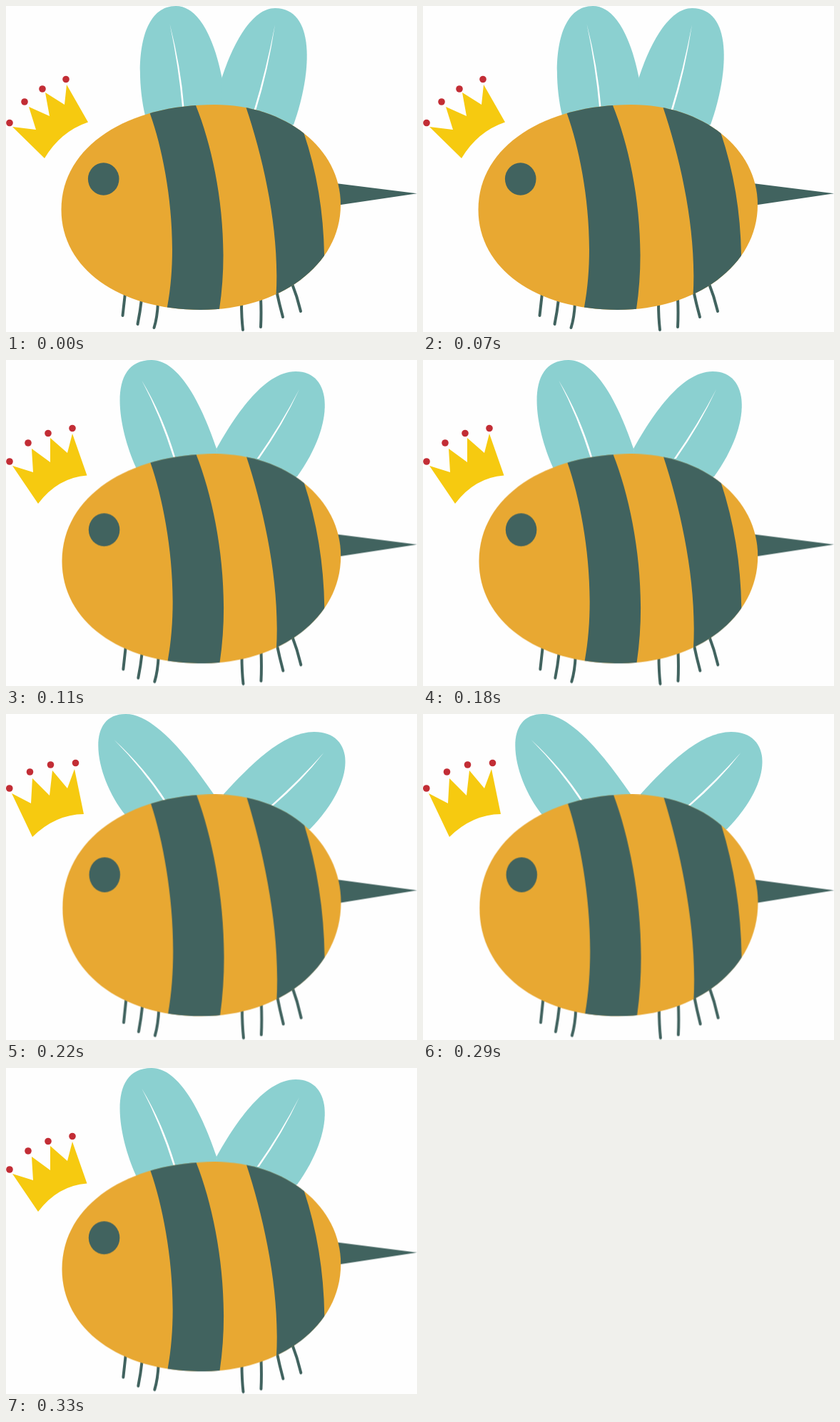
Animation of 576 by 456 pixels, one loop 440 ms. Source, as an HTML page:

```html
<!DOCTYPE html>
<html lang="en">
<head>
<meta charset="utf-8">
<title>Queen bee</title>
<style>
  html, body { margin: 0; width: 100%; height: 100%; overflow: hidden; background: #fefefe; }
  svg { display: block; width: 100%; height: 100%; }
  .wing { fill: #8bd0d0; }
  .vein { fill: #fff; }
  .crown { fill: #f6ca10; }
  .jewel { fill: #c22d35; }
  .fur { fill: #e8a832; }
  .dark { fill: #41635f; }
  .legs { fill: none; stroke: #41635f; stroke-width: 4; stroke-linecap: round; }

  .body { transform-origin: 576px 454px; animation: stretch 440ms step-end infinite; }
  .pose { visibility: hidden; animation: 440ms step-end infinite; }
  .up { animation-name: up; }
  .mid { animation-name: mid; }
  .spread { animation-name: spread; }

  @keyframes stretch {
    0% { transform: none; }
    25%, 75% { transform: scale(.998, 1.021); }
    50% { transform: scale(.9966, 1.081); }
  }
  @keyframes up { 0% { visibility: visible; } 25%, 100% { visibility: hidden; } }
  @keyframes mid { 0%, 50% { visibility: hidden; } 25%, 75% { visibility: visible; } }
  @keyframes spread { 0%, 75%, 100% { visibility: hidden; } 50% { visibility: visible; } }
</style>
</head>
<body>
<svg viewBox="0 0 576 456" preserveAspectRatio="none">
  <defs>
    <path id="shell" d="M77.5 285C77.5 195 172 138 292 138C392 138 469 199 469 278C469 363 383 425 273 425C158 425 77.5 367 77.5 285Z"/>
    <clipPath id="inside"><use href="#shell"/></clipPath>
  </defs>

  <g class="pose up">
    <path class="wing" d="M198 170L195 153C181 94 184 0 238 0C275 0 295 60 303 102L310 200Z"/>
    <path class="wing" d="M302 102C318 52 345 3 377 3C433 3 430 90 403 166L300 200Z"/>
    <path class="vein" d="M229.5 25Q245 85 249.5 141h-2.5Q242 85 229.5 25ZM377 26Q367.500 90 350.400 145h-2.700Q364.500 90 377 26Z"/>
    <path class="crown" d="M9 169L42 173L32 141L61 154L55 121L82 138L85 110L115 162.500Q76.500 175.500 54 213Z"/>
    <g class="jewel">
      <circle cx="5" cy="163.500" r="4.800"/><circle cx="26" cy="134" r="4.800"/>
      <circle cx="51" cy="116" r="4.800"/><circle cx="84" cy="102.500" r="4.800"/>
    </g>
  </g>

  <g class="pose mid">
    <path class="wing" d="M190 170L182 150C156 92 141 0 204 0C248 0 280 80 295 124L310 200Z"/>
    <path class="wing" d="M295 124C318 83 360 16 406 16C458 16 462 88 408 163L300 200Z"/>
    <path class="vein" d="M190.500 29Q220 78 237.500 137h-2.600Q216.500 78 190.500 29ZM411 41Q388.500 90 354.700 138h-3Q385.500 90 411 41Z"/>
    <path class="crown" d="M9 148L38 157L36 124L62 143L62 109L86 130L93 103L113.500 161.500Q72.500 164.500 45 201Z"/>
    <g class="jewel">
      <circle cx="5" cy="142" r="4.800"/><circle cx="31" cy="116" r="4.800"/>
      <circle cx="59" cy="102.500" r="4.800"/><circle cx="93" cy="95.500" r="4.800"/>
    </g>
  </g>

  <g class="pose spread">
    <path class="wing" d="M178 160L167 141C127 92 107 0 168 0C209 0 258 64 291 112L310 200Z"/>
    <path class="wing" d="M305 112C340 74 387 25 432 25C487 25 495 90 426 161L300 200Z"/>
    <path class="vein" d="M151.500 36Q195 76 224.500 122h-3Q192 77 151.500 36ZM445.500 54Q414.500 94 374.700 128h-3.500Q411.500 92 445.500 54Z"/>
    <path class="crown" d="M8 111L35 125L37 90L61 114L65 79L86 104L96 77L109 140Q69 140.500 37 172Z"/>
    <g class="jewel">
      <circle cx="4.800" cy="104" r="4.800"/><circle cx="33.500" cy="81" r="4.800"/>
      <circle cx="62.500" cy="71" r="4.800"/><circle cx="97.500" cy="68.500" r="4.800"/>
    </g>
  </g>

  <g class="body">
    <path class="legs" d="M167 402Q165 420 163.500 433M190 410Q188 428 184.500 445M213 415Q212 436 207.500 450M330 415Q330 436 332 453M357 408Q358 430 357 449M379 398Q383 417 388 435M400 386Q408 406 413 427"/>
    <path class="dark" d="M464 248.300L576 262.200L466 278.500Z"/>
    <use class="fur" href="#shell"/>
    <g class="dark" clip-path="url(#inside)">
      <path d="M195 130L202 151C224 212 244 325 226 421L222 440H296L299 424C315 320 294 208 266 139L262 130Z"/>
      <path d="M332 130L336.500 142C361 215 384 315 378.500 405L377 440H446V348Q444.500 258 417.500 178L401 130Z"/>
    </g>
    <ellipse class="dark" cx="136.700" cy="242" rx="21.800" ry="22.700"/>
  </g>
</svg>
</body>
</html>
```
